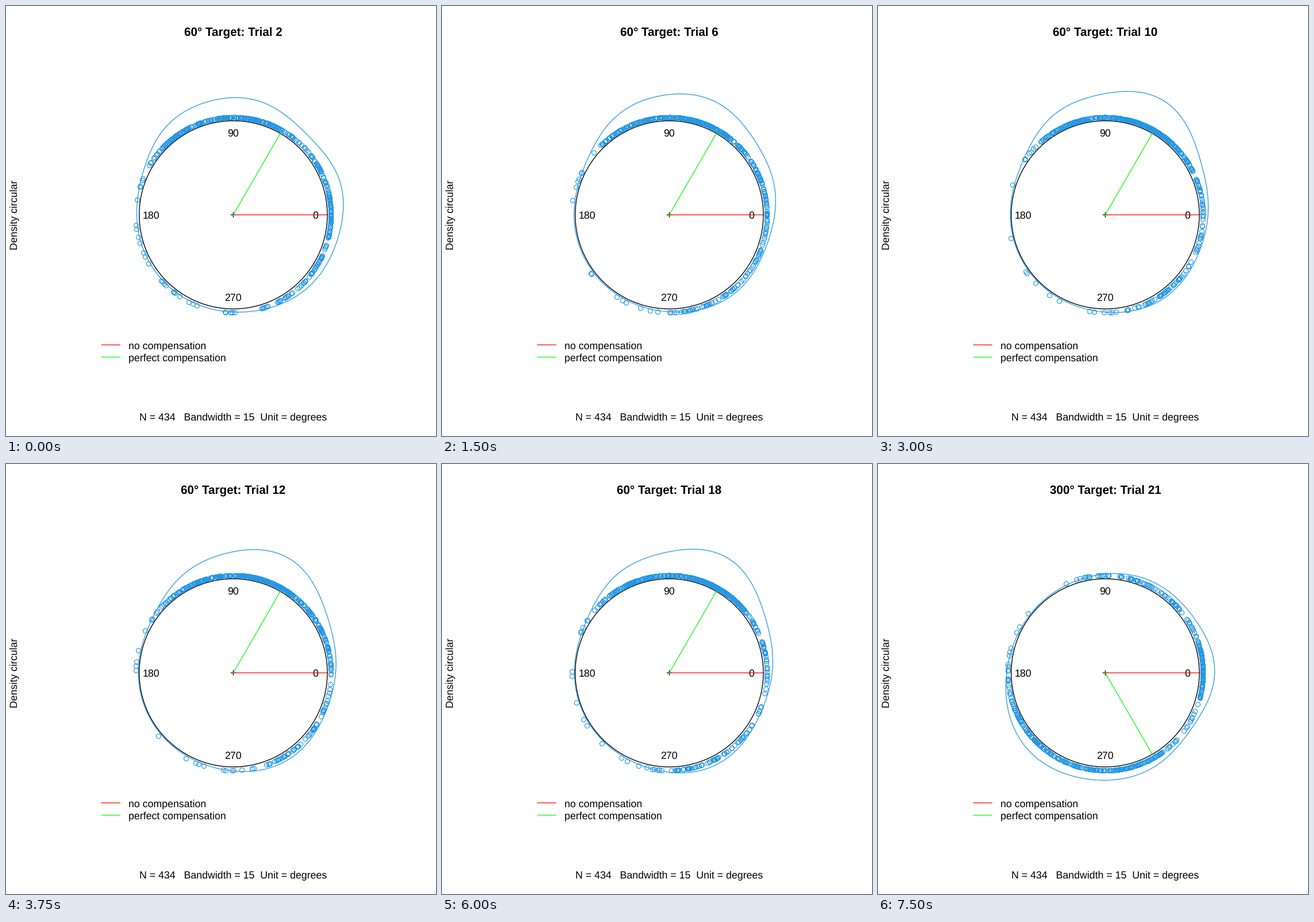
Write a matplotlib script that moves like this. It is 748 by 748 pixels and loops after 8 s.

```python
import numpy as np
import matplotlib.pyplot as plt
from matplotlib.animation import FuncAnimation

SIZE, DPI = 748, 100
CX, CY, R = 395.37, 363.31, 163.6
BLUE, RED, GREEN = "#2297E6", "#FF0000", "#00FF00"
N, BANDWIDTH = 434, 15
TRIALS = [*range(2, 21, 2), 21]

# Bumps of the density as (centre in degrees, height in pixels):
# main peak, left shoulder, right shoulder, lower side.
WIDTHS = [23, 20, 22, 26]
KEYS = {
    2: [(80, 33), (122, 22), (18, 24), (-35, 14)],
    4: [(72, 42), (113, 26), (18, 21), (-45, 12)],
    8: [(69, 45), (112, 24), (18, 21), (-50, 12)],
    10: [(65, 56), (112, 27), (10, 12), (-52, 12)],
    14: [(67, 52), (108, 20), (14, 13), (-60, 15)],
    18: [(65, 57), (112, 26), (12, 14), (-62, 14.5)],
}
OPPOSITE = [(228, 24), (292, 18), (0, 22), (55, 14)]
OPPOSITE_WIDTHS = [30, 27, 20, 30]

plt.rcParams["font.family"] = "Liberation Sans"
plt.rcParams["text.hinting"] = "no_hinting"


def pt(px):
    return px * 72 / DPI


def polar(deg, r):
    a = np.radians(deg)
    return CX + r * np.cos(a), CY - r * np.sin(a)


def target(trial):
    return 60 if trial <= 20 else 300


def mixture(trial):
    """Centres, heights and widths of the bumps, and the even floor."""
    floor = 1 + 6 / trial
    if target(trial) == 300:
        return *np.transpose(OPPOSITE), np.array(OPPOSITE_WIDTHS), floor
    keys = np.array(list(KEYS.values()), float).reshape(len(KEYS), -1)
    bumps = [np.interp(trial, list(KEYS), column) for column in keys.T]
    return np.array(bumps[0::2]), np.array(bumps[1::2]), np.array(WIDTHS), floor


def density(trial, deg):
    centres, heights, widths, floor = mixture(trial)
    away = (deg[:, None] - centres + 180) % 360 - 180
    return floor + np.exp(-0.5 * (away / widths) ** 2) @ heights


def sample(trial):
    """Random angles whose smoothed density is the curve."""
    centres, heights, widths, floor = mixture(trial)
    rng = np.random.default_rng(trial)
    areas = np.append(heights * widths * np.sqrt(2 * np.pi), floor * 360)
    counts = rng.multinomial(N, areas / areas.sum())
    spreads = np.sqrt(widths ** 2 - BANDWIDTH ** 2)
    parts = [rng.normal(c, s, n) for c, s, n in zip(centres, spreads, counts)]
    return np.concatenate(parts + [rng.uniform(0, 360, counts[-1])])


fig = plt.figure(figsize=(SIZE / DPI, SIZE / DPI), dpi=DPI, facecolor="white")
ax = fig.add_axes([0, 0, 1, 1])
ax.set(xlim=(0, SIZE), ylim=(SIZE, 0))
ax.axis("off")


def label(x, y, s, size=17.81, **kw):
    return ax.text(x, y, s, fontsize=pt(size), color="black", va="baseline", **kw)


def line(xs, ys, color, width=1.25, z=5):
    return ax.plot(xs, ys, color=color, lw=pt(width), zorder=z, snap=False)[0]


line(*polar(np.linspace(0, 360, 721), R), "black", 1.35, 2)
dots, = ax.plot([], [], "o", ms=pt(8), mew=pt(1.15), mfc="none", mec=BLUE,
                zorder=3, snap=False)
curve = line([], [], BLUE, z=4)
line([CX - 4, CX + 4], [CY, CY], "black", z=4)
line([CX, CX], [CY - 4, CY + 4], "black", z=4)

for deg in range(0, 360, 90):
    x, y = polar(deg, 0.875 * R)
    label(x, y + 6.3, str(deg), ha="center")

line([CX, CX + R], [CY, CY], RED)
aim = line([], [], GREEN)

title = label(CX, 51.2, "", 20.7, ha="center", weight="bold")
label(CX, 720.2, f"N = {N}   Bandwidth = {BANDWIDTH}  Unit = degrees", ha="center")
label(19.2, CY, "Density circular", ha="center", rotation=90, rotation_mode="anchor")

for y, color, s in [(589.5, RED, "no compensation"),
                    (610.9, GREEN, "perfect compensation")]:
    line([166, 198.3], [y, y], color)
    label(213, y + 6.3, s, ha="left")

angles = {trial: sample(trial) for trial in TRIALS}
sweep = np.linspace(266.4, 625.7, 720)  # leaves a small gap at the bottom


def draw(i):
    trial = TRIALS[i // 3]
    goal = target(trial)
    title.set_text(f"{goal}° Target: Trial {trial}")
    dots.set_data(*polar(angles[trial], 1.038 * R))
    curve.set_data(*polar(sweep, R + density(trial, sweep)))
    x, y = polar(goal, R)
    aim.set_data([CX, x], [CY, y])
    return title, dots, curve, aim


anim = FuncAnimation(fig, draw, frames=32, interval=250, repeat=True, repeat_delay=0)
plt.show()
```
